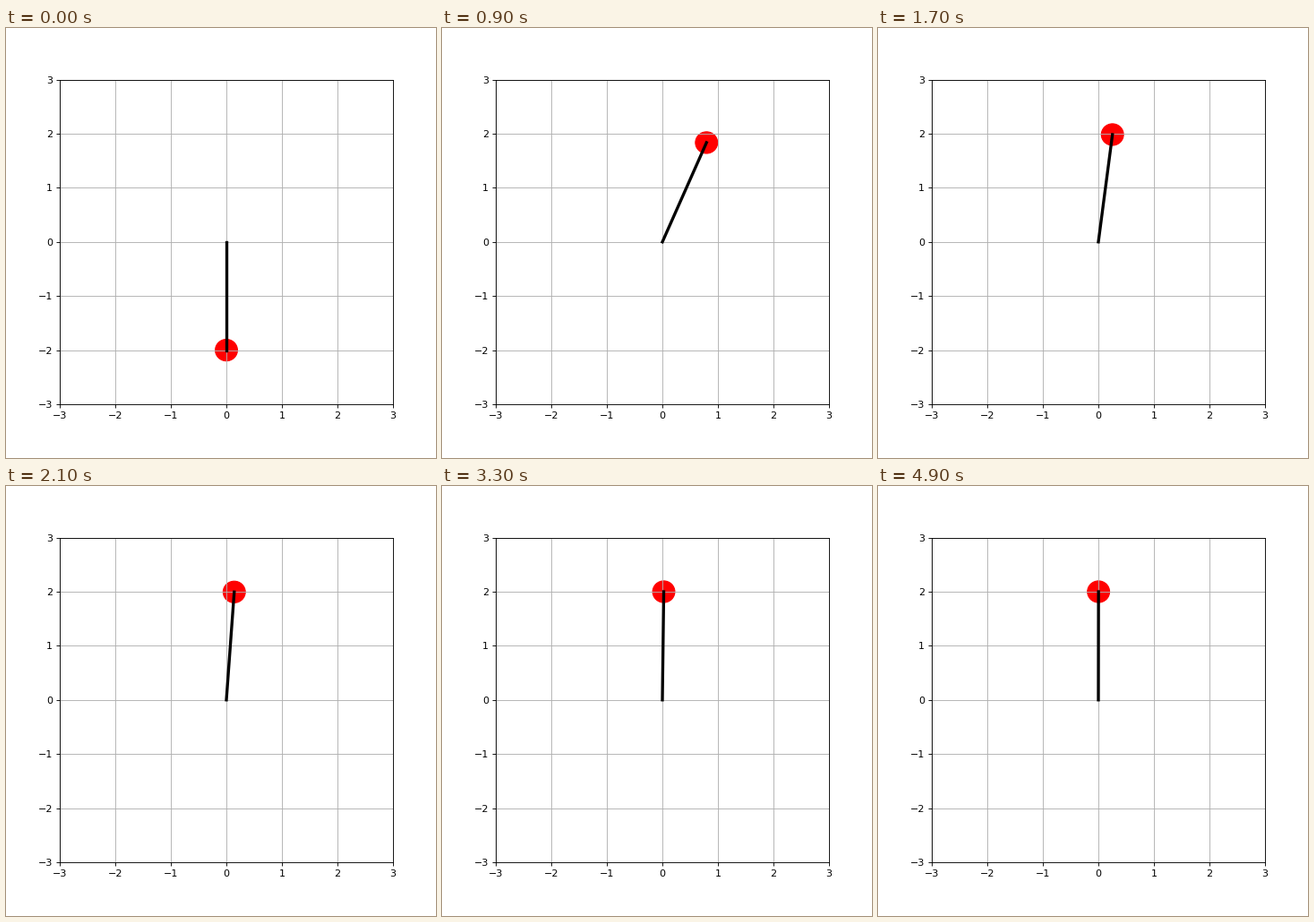
Write a matplotlib script that moves like this. It is 480 by 480 pixels and loops after 5 s.

```python
import numpy as np
import matplotlib.pyplot as plt
from matplotlib.animation import FuncAnimation
from matplotlib.patches import Circle

FRAMES = 50
INTERVAL = 100
LENGTH = 2.0

# Slow settling towards upright, plus a quick initial swing from hanging
SETTLE_START = 1.52
SETTLE_RATE = 1.46
SWING_TIME = 0.2


def angle(t):
    """Angle from the upright position at time t in seconds."""
    settle = SETTLE_START * np.exp(-SETTLE_RATE * t)
    swing = (np.pi - SETTLE_START) * np.exp(-(t / SWING_TIME) ** 2)
    return settle + swing


plt.rcParams["font.family"] = "DejaVu Sans"
fig = plt.figure(figsize=(6, 6), dpi=80)
ax = fig.add_axes([0.125, 0.125, 0.775, 0.755])
ax.set_xlim(-3, 3)
ax.set_ylim(-3, 3)
ax.set_xticks(range(-3, 4))
ax.set_yticks(range(-3, 4))
ax.grid(True)

bob = ax.add_patch(Circle((0, -LENGTH), 0.2, color="red"))
rod, = ax.plot([0, 0], [0, -LENGTH], color="black", lw=3)


def update(frame):
    theta = angle(frame * INTERVAL / 1000)
    x, y = LENGTH * np.sin(theta), LENGTH * np.cos(theta)
    rod.set_data([0, x], [0, y])
    bob.center = (x, y)
    return bob, rod


anim = FuncAnimation(fig, update, frames=FRAMES, interval=INTERVAL,
                     repeat=True, repeat_delay=0)
plt.show()
```
